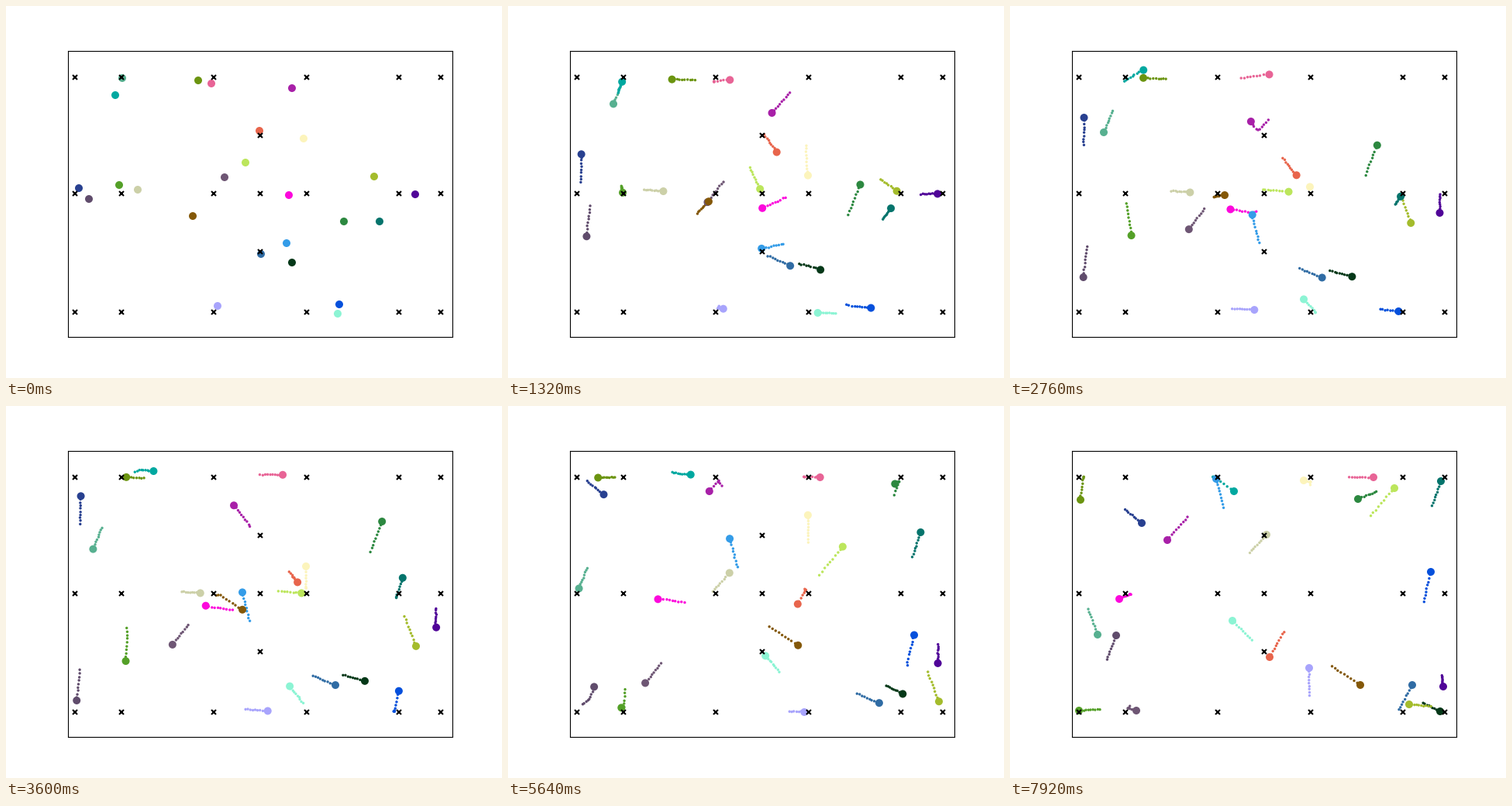
These frames come from a looping animation (640 px wide and 480 px high, 8 s). A matplotlib script:

```python
import numpy as np
import matplotlib.pyplot as plt
from matplotlib.animation import FuncAnimation

LAST = 66           # last step of the walk
TICK = 40           # ms per drawn frame
HOLD = 3            # drawn frames per step
TAIL = 9            # dots behind each walker
REACH = 6           # a mark counts as visited at this distance
REST = 3            # steps spent turning at a mark

# Marks are named by column letter and row number.
MARKS = {c + str(r): (x, y)
         for c, x in zip("abcefg", (89, 149, 268, 388, 507, 561))
         for r, y in enumerate((92, 242, 395), 1)}
MARKS |= {f"d{r}": (328, 92 + 75 * r) for r in (1, 2, 3)}

rng = np.random.default_rng(4)
colors, paths = [], []


def soften(values):
    padded = np.pad(values, 1, mode="reflect", reflect_type="odd")
    return np.convolve(padded, (0.25, 0.5, 0.25), "valid")


def walk(color, start, end, *detours, **visits):
    """Walk from start to end, with (step, x, y) detours and mark=step visits."""
    plan = [(k, (x, y), False) for k, x, y in detours]
    plan += [(k, MARKS[name], True) for name, k in visits.items()]
    steps, spots = [0], [np.array(start, float)]
    for k, spot, is_mark in sorted(plan):
        spot = np.array(spot, float)
        if is_mark:
            way = spot - spots[-1]
            spot -= REACH * way / np.hypot(*way)
            steps.append(k + REST)
            spots.append(spot)
            steps.insert(-1, k)
            spots.insert(-1, spot)
        else:
            steps.append(k)
            spots.append(spot)
    steps.append(LAST)
    spots.append(np.array(end, float))

    t = np.arange(LAST + 1)
    path = np.column_stack([soften(np.interp(t, steps, v))
                            for v in np.transpose(spots)])
    path[1:-1] += rng.normal(0, 0.35, (LAST - 1, 2))
    colors.append(color)
    paths.append(path)


walk("#57b090", (150, 93), (113, 295), a2=47)
walk("#00a8a0", (141, 115), (289, 110), (23, 172, 82), b1=11, c1=57)
walk("#6b9410", (248, 96), (91, 121), b1=28, a1=56)
walk("#e86496", (265, 100), (469, 92), (23, 335, 88), c1=3, e1=38)
walk("#a820a8", (369, 106), (203, 173), (19, 320, 162), c1=40)
walk("#e8654c", (327, 161), (335, 324), (23, 369, 219), e2=39)
walk("#fcf4bc", (384, 171), (379, 96), (23, 387, 234), e2=15, e1=58)
walk("#bce65c", (309, 202), (496, 106), d2=11, e2=29)
walk("#6e5674", (282, 221), (163, 393), b3=58)
walk("#284090", (94, 235), (170, 151), (36, 97, 93))
walk("#54a028", (146, 231), (89, 393), (23, 157, 296), b2=7, b3=43)
walk("#604c6c", (107, 249), (137, 296), (42, 105, 379), a3=32)
walk("#ccd0a8", (170, 237), (331, 166), c2=34)
walk("#845808", (241, 271), (452, 360), (23, 276, 244), c2=14)
walk("#fc08dc", (365, 244), (141, 249), (15, 315, 267), b2=57)
walk("#349ce8", (362, 306), (266, 94), (12, 324, 314))
walk("#306ca4", (329, 320), (519, 360), f3=54)
walk("#043818", (369, 331), (555, 394), (38, 488, 361))
walk("#a8a4fc", (273, 387), (386, 338), (53, 387, 389), c3=6, e3=44)
walk("#8cf4d4", (428, 397), (287, 277), e3=13, d3=47)
walk("#0450dc", (430, 385), (543, 214), f3=21)
walk("#2c8840", (436, 278), (449, 120), f1=42)
walk("#04746c", (482, 278), (556, 97), f2=20)
walk("#a4bc2c", (475, 220), (515, 385), f2=10, g3=49)
walk("#500498", (528, 243), (559, 362), (47, 555, 332), g2=11)

paths = np.array(paths)

fig, ax = plt.subplots(figsize=(6.4, 4.8), dpi=100)
fig.subplots_adjust(left=0.125, right=0.9, bottom=0.11, top=0.88)
ax.set(xlim=(80, 576), ylim=(427.2, 57.6), xticks=[], yticks=[])


def dots(pixels, repeat, z):
    size = (pixels * 0.72) ** 2
    return ax.scatter(*np.zeros((2, len(colors) * repeat)), s=size, linewidths=0,
                      c=np.repeat(colors, repeat), zorder=z)


trails = dots(3.4, TAIL, 2)
heads = dots(10, 1, 3)
mark_x, mark_y = np.transpose(list(MARKS.values())) + 0.2
ax.plot(mark_x, mark_y, "x", color="black", ms=3.9, mew=1.5, zorder=4)


def draw(i):
    k = i // HOLD
    past = np.clip(np.arange(k - TAIL, k), 0, None)
    trails.set_offsets(paths[:, past].reshape(-1, 2))
    heads.set_offsets(paths[:, k])
    return trails, heads


anim = FuncAnimation(fig, draw, frames=8000 // TICK, interval=TICK,
                     repeat=True, repeat_delay=0)
plt.show()
```
